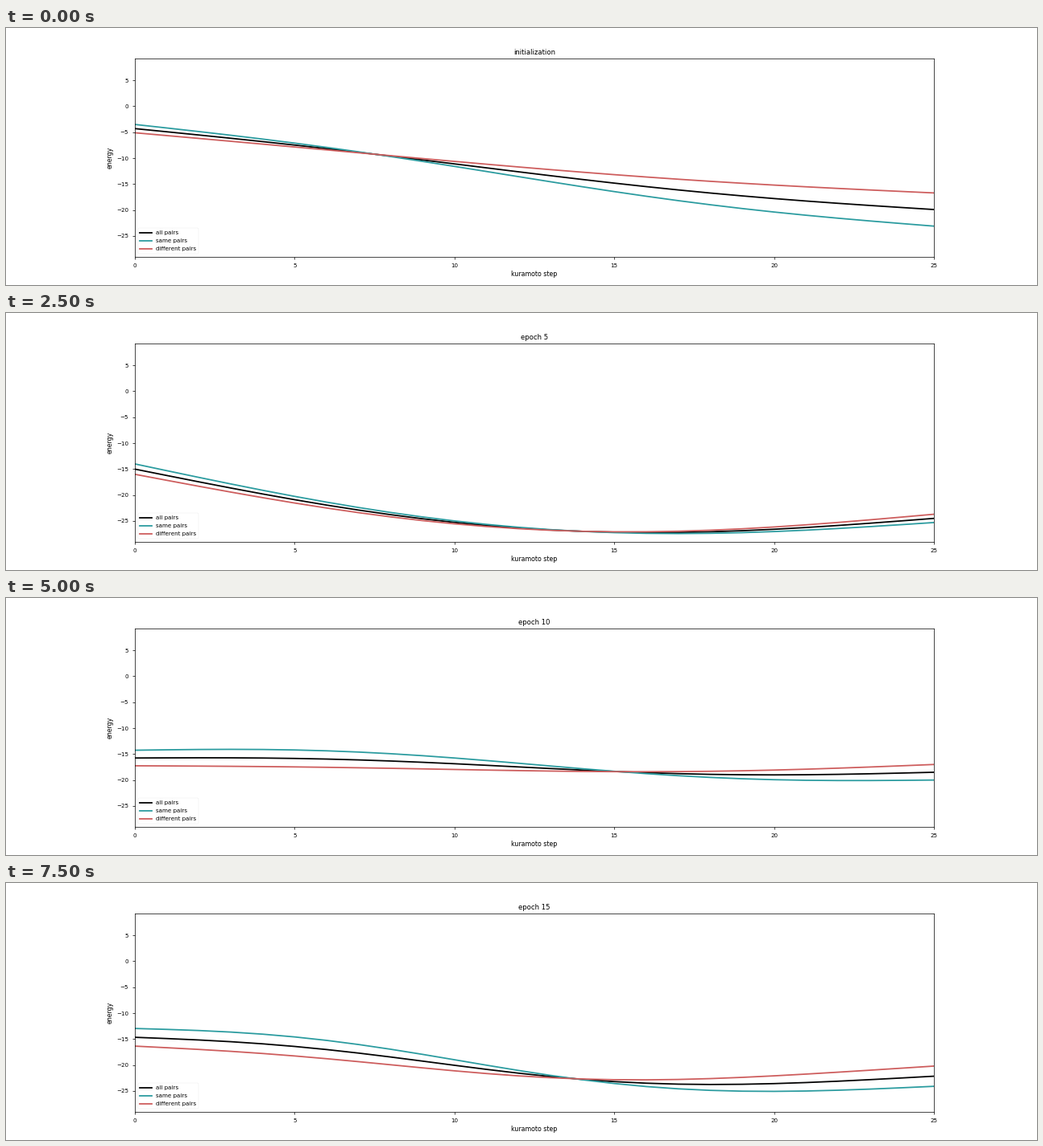
A matplotlib script for the animation above (8 s loop, 1280 by 320 pixels).

```python
import matplotlib.pyplot as plt
import numpy as np
from matplotlib.animation import FuncAnimation

EPOCHS = 16
STEPS = np.arange(26)

plt.rcParams.update({
    "font.family": "DejaVu Sans",
    "axes.titlesize": 9.6, "axes.labelsize": 8.8,
    "xtick.labelsize": 8, "ytick.labelsize": 8, "legend.fontsize": 8,
    "xtick.major.pad": 5.6, "ytick.major.pad": 5.6,
    "lines.linewidth": 2, "patch.linewidth": 0.24,
    "axes.linewidth": 0.8, "legend.labelspacing": 0.57,
})

# epoch: mean energy and half the gap between the pairs, as wave() arguments
KEYS = {
    0: ((-4.3, -19.9, -0.9, 0.5), (0.8, -3.2, 0.15, 0.3)),
    1: ((-3, -21.5, -3.5), (0.5, -2)),
    3: ((-2.45, -15.05, -4.35, -0.65, -0.15), (0.25, -0.7, -0.2)),
    5: ((-15, -24.5, -6.8), (1, -0.8)),
    6: ((-14.85, -19.2, -4.5, 0.1, 0.2), (1.05, -0.5, -0.6, 0.25)),
    8: ((-11.95, -16, -3.2, 0.1), (0.8, -1.6, -0.1, 0.5)),
    10: ((-15.75, -18.5, -0.5, 0.8), (1.5, -1.5, 0.6, 0.4)),
    12: ((-15.35, -19.45, -2.7, 0.85), (1.8, -1.5, 0.15, 0.55)),
    15: ((-14.65, -22.15, -3.2, 1.4, 0.3), (1.7, -1.95, 0.5, 0.6)),
}


def wave(start, end, *swings):
    """Straight line plus sine harmonics that vanish at both ends."""
    u = STEPS / STEPS[-1]
    return start + (end - start) * u + sum(
        s * np.sin(k * np.pi * u) for k, s in enumerate(swings, 1))


def energies(epoch):
    """Curves for all, same and different pairs."""
    lo = max(k for k in KEYS if k <= epoch)
    hi = min(k for k in KEYS if k >= epoch)
    w = (epoch - lo) / max(hi - lo, 1)
    mean, gap = ((1 - w) * wave(*a) + w * wave(*b)
                 for a, b in zip(KEYS[lo], KEYS[hi]))
    return mean, mean + gap, mean - gap


fig, ax = plt.subplots(figsize=(20, 5), dpi=64)
lines = [ax.plot([], [], color=color, label=label)[0]
         for color, label in (("black", "all pairs"),
                              ("#2a9b9f", "same pairs"),
                              ("#cd5c5c", "different pairs"))]
ax.set(xlim=(0, 25), ylim=(-29, 9.15), xlabel="kuramoto step", ylabel="energy",
       xticks=range(0, 26, 5), yticks=range(-25, 6, 5))
ax.legend(loc="lower left")


def draw(epoch):
    for line, y in zip(lines, energies(epoch)):
        line.set_data(STEPS, y)
    title = ax.set_title(f"epoch {epoch}" if epoch else "initialization")
    return [*lines, title]


anim = FuncAnimation(fig, draw, frames=EPOCHS, interval=500,
                     repeat=True, repeat_delay=0)
plt.show()
```
